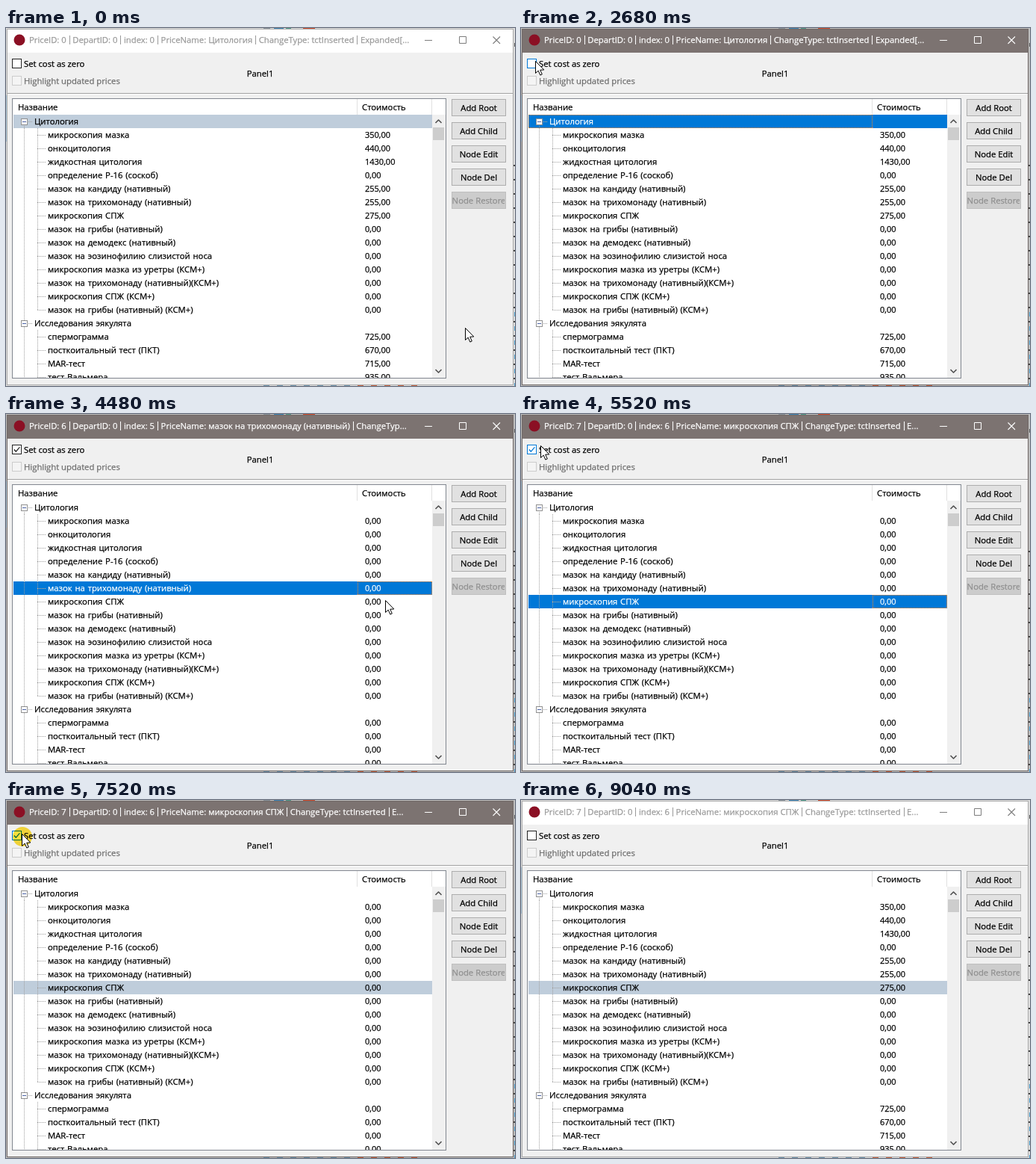
An HTML page with a canvas that plays this animation: 682 px wide and 479 px high, repeating every 9.12 s.

```html
<!DOCTYPE html>
<html lang="ru">
<head>
<meta charset="utf-8">
<title>Price tree</title>
<style>
html, body { margin: 0; width: 100%; height: 100%; overflow: hidden; background: #f0f0f0; }
canvas { display: block; }
</style>
</head>
<body>
<canvas id="stage" width="682" height="479"></canvas>
<script>
const ctx = document.getElementById('stage').getContext('2d');
const LOOP = 9120, TICK = 40, ROW_H = 18, LIST_TOP = 116;
const FAMILY = '"Open Sans", "Noto Sans", sans-serif';
const FONT = '11.3px ' + FAMILY, PRICE_FONT = '11px ' + FAMILY;
const BLUE = '#0078d7';

// Rows without a price are tree roots.
const rows = [
  ['Цитология'],
  ['микроскопия мазка', 350],
  ['онкоцитология', 440],
  ['жидкостная цитология', 1430],
  ['определение P-16 (соскоб)', 0],
  ['мазок на кандиду (нативный)', 255],
  ['мазок на трихомонаду (нативный)', 255],
  ['микроскопия СПЖ', 275],
  ['мазок на грибы (нативный)', 0],
  ['мазок на демодекс (нативный)', 0],
  ['мазок на эозинофилию слизистой носа', 0],
  ['микроскопия мазка из уретры (КСМ+)', 0],
  ['мазок на трихомонаду (нативный)(КСМ+)', 0],
  ['микроскопия СПЖ (КСМ+)', 0],
  ['мазок на грибы (нативный) (КСМ+)', 0],
  ['Исследования эякулята'],
  ['спермограмма', 725],
  ['посткоитальный тест (ПКТ)', 670],
  ['MAR-тест', 715],
  ['тест Вальмера', 935]
];

const titles = {
  0: 'PriceID: 0 | DepartID: 0 | index: 0 | PriceName: Цитология | ChangeType: tctInserted | Expanded[...',
  6: 'PriceID: 6 | DepartID: 0 | index: 5 | PriceName: мазок на трихомонаду (нативный) | ChangeTyp...',
  7: 'PriceID: 7 | DepartID: 0 | index: 6 | PriceName: микроскопия СПЖ | ChangeType: tctInserted | E...'
};

// Pointer path: time, x, y
const path = [
  [960, 672, 98], [1160, 425, 92], [1400, 176, 76], [1600, 88, 62], [1840, 37, 51],
  [2240, 20, 45], [2640, 20, 45], [2680, 19, 44], [3280, 19, 44],
  [3440, 90, 92], [3680, 360, 205], [3960, 504, 257], [4080, 504, 257],
  [4200, 504, 237], [4360, 505, 238], [4480, 508, 249], [4680, 508, 250],
  [4800, 400, 170], [4960, 194, 52], [5160, 92, 48], [5520, 26, 42],
  [6200, 26, 42], [6320, 21, 45], [7840, 21, 45],
  [8000, 95, 115], [8200, 320, 300], [8400, 510, 456], [8520, 518, 482]
];

// Pressed intervals of the mouse button
const clicks = [[2760, 3040], [4200, 4360], [4520, 4680], [5760, 6040], [6600, 6800], [7520, 7760]];

const mix = (a, b, k) => 'rgb(' + a.map((v, i) => Math.round(v + (b[i] - v) * k)).join(',') + ')';
const clamp = v => Math.max(0, Math.min(1, v));

function rect(x, y, w, h, color) {
  ctx.fillStyle = color;
  ctx.fillRect(x, y, w, h);
}

function frame(x, y, w, h, border, fill) {
  rect(x, y, w, h, border);
  rect(x + 1, y + 1, w - 2, h - 2, fill);
}

// A hairline stroke gives the text the weight of hinted screen type.
function text(s, x, y, color = '#000', align = 'left') {
  ctx.fillStyle = ctx.strokeStyle = color;
  ctx.lineWidth = 0.25;
  ctx.textAlign = align;
  ctx.fillText(s, x, y);
  ctx.strokeText(s, x, y);
}

function line(points, color, width = 1) {
  ctx.strokeStyle = color;
  ctx.lineWidth = width;
  ctx.beginPath();
  points.forEach(([x, y]) => ctx.lineTo(x, y));
  ctx.stroke();
}

function dots(x, y, length, vertical, color = '#a0a0a0') {
  for (let i = 0; i < length; i += 2) rect(vertical ? x : x + i, vertical ? y + i : y, 1, 1, color);
}

function pointerAt(t) {
  if (t < 240) return [615, 401];
  if (t < path[0][0] || t > path[path.length - 1][0]) return null;
  const i = Math.max(1, path.findIndex(p => p[0] >= t));
  const [t0, x0, y0] = path[i - 1], [t1, x1, y1] = path[i];
  const k = (t - t0) / (t1 - t0);
  return [Math.round(x0 + (x1 - x0) * k), Math.round(y0 + (y1 - y0) * k)];
}

function stateAt(t) {
  const pointer = pointerAt(t);
  return {
    pointer,
    active: t >= 9040 ? 0 : clamp((t - 440) / 320),
    selected: t < 4200 ? 0 : t < 4520 ? 6 : 7,
    listFocus: (t >= 480 && t < 2760) || (t >= 4200 && t < 5760),
    checked: (t >= 2880 && t < 5880) || (t >= 6680 && t < 7640),
    hot: !!pointer && pointer[0] >= 8 && pointer[0] < 105 && pointer[1] >= 39 && pointer[1] < 57,
    click: clicks.find(([a, b]) => t >= a && t < b)
  };
}

function drawDesktop(k) {
  rect(0, 0, 682, 479, mix([222, 222, 222], [190, 190, 190], k));
  rect(345, 0, 9, 1, '#8a949c');
  rect(359, 0, 13, 1, '#3b83b5');
  rect(375, 0, 7, 1, '#4c9a8a');
  rect(398, 0, 16, 1, '#d0492b');
  for (let y = 183; y < 470; y += 19) {
    rect(680, y, 2, 2, '#444');
    if (y > 360) rect(681, y + 7, 1, 6, '#4a9bc9');
  }
  rect(681, 20, 1, 5, '#555');
  rect(0, 90, 1, 62, '#a9c4d8');
  for (let x = 345; x < 560; x += 18) rect(x, 478, 8, 1, x > 470 ? '#c2603f' : '#6d93ad');
}

function drawTitle(s) {
  const k = s.active;
  const ink = mix([153, 153, 153], [255, 255, 255], k);
  const icon = mix([125, 125, 125], [255, 255, 255], k);
  rect(2, 2, 677, 31, mix([255, 255, 255], [124, 115, 113], k));
  ctx.fillStyle = '#8b1024';
  ctx.beginPath();
  ctx.arc(18, 16, 7.5, 0, Math.PI * 2);
  ctx.fill();
  let x = 31;
  titles[s.selected].split(' | ').forEach((part, i) => {
    if (i) {
      rect(Math.round(x + 4), 10, 1, 12, ink);
      x += 8.5;
    }
    text(part, x, 20, ink);
    x += ctx.measureText(part).width;
  });
  rect(561, 16, 10, 1, icon);
  ctx.strokeStyle = icon;
  ctx.lineWidth = 1;
  ctx.strokeRect(607.5, 11.5, 9, 9);
  line([[652.5, 11.5], [662, 21]], icon, 1.1);
  line([[662, 11.5], [652.5, 21]], icon, 1.1);
}

function drawOptions(s) {
  const ink = s.hot ? BLUE : '#222';
  frame(8, 41, 13, 13, ink, '#fff');
  if (s.checked) line([[10.8, 47.5], [13.4, 50.2], [18.4, 44.3]], ink, 1.3);
  text('Set cost as zero', 24, 52);
  frame(8, 64, 13, 13, '#ccc', '#f4f4f4');
  text('Highlight updated prices', 24, 75, '#6d6d6d');
  text('Panel1', 340.5, 65, '#000', 'center');
  rect(2, 87, 677, 1, '#a0a0a0');
  rect(2, 88, 677, 1, '#fff');
}

function drawButtons() {
  ['Add Root', 'Add Child', 'Node Edit', 'Node Del', 'Node Restore'].forEach((label, i) => {
    const y = 95 + i * 31, off = i === 4;
    frame(597, y, 73, 23, off ? '#bfbfbf' : '#adadad', off ? '#ccc' : '#e1e1e1');
    ctx.save();
    ctx.beginPath();
    ctx.rect(598, y, 70, 23);
    ctx.clip();
    text(label, 633.5, y + 16, off ? '#8f8f8f' : '#000', 'center');
    ctx.restore();
  });
}

function drawFocus(x, y, w) {
  const color = '#ff8728';
  dots(x, y, w, false, color);
  dots(x, y + ROW_H - 1, w, false, color);
  dots(x, y, ROW_H, true, color);
  dots(x + w - 1, y, ROW_H, true, color);
}

function drawRow([name, price], i, s) {
  const y = LIST_TOP + i * ROW_H, mid = y + 9, root = price === undefined;
  const picked = i === s.selected, lit = picked && s.listFocus;
  const ink = lit ? '#fff' : '#000';
  if (picked) rect(10, y, 561, ROW_H, lit ? BLUE : '#bfcddb');
  if (root) {
    if (i) dots(24, y, ROW_H, true);
    else dots(24, mid, 9, true);
    dots(30, mid, 6, false, lit ? '#d6b08c' : undefined);
    frame(20, mid - 4, 9, 9, '#919191', '#fff');
    rect(22, mid, 5, 1, '#4b63a7');
  } else {
    const last = i === 14;
    dots(24, y, ROW_H, true);
    dots(42, y, last ? 9 : ROW_H, true);
    dots(42, mid, 12, false, lit ? '#d6b08c' : undefined);
    ctx.font = PRICE_FONT;
    text((s.checked ? 0 : price) + ',00', 481, y + 13, ink);
    ctx.font = FONT;
  }
  ctx.wordSpacing = '0.8px';
  text(name, root ? 38 : 56, y + 13, ink);
  ctx.wordSpacing = '0px';
  if (lit) {
    if (root) drawFocus(10, y, 461);
    else drawFocus(471, y, 100);
  }
}

function drawList(s) {
  frame(8, 94, 582, 375, '#828790', '#fff');
  text('Название', 16, 110);
  text('Стоимость', 477, 110);
  rect(470, 95, 1, 21, '#e0e0e0');
  rect(570, 95, 1, 21, '#e0e0e0');
  ctx.save();
  ctx.beginPath();
  ctx.rect(9, LIST_TOP, 580, 352);
  ctx.clip();
  rows.forEach((row, i) => drawRow(row, i, s));
  rect(571, LIST_TOP, 18, 352, '#f0f0f0');
  rect(572, 133, 15, 17, '#cdcdcd');
  line([[575.5, 127], [579.5, 123], [583.5, 127]], '#505050', 1.6);
  line([[575.5, 457], [579.5, 461], [583.5, 457]], '#505050', 1.6);
  ctx.restore();
}

function drawPointer(s, t) {
  if (!s.pointer) return;
  const [x, y] = s.pointer;
  if (s.click) {
    ctx.save();
    ctx.globalCompositeOperation = 'multiply';
    ctx.fillStyle = '#ffdf3c';
    ctx.beginPath();
    ctx.arc(x + 1, y + 4, t - s.click[0] < 80 ? 13 : 14.5, 0, Math.PI * 2);
    ctx.fill();
    ctx.restore();
  }
  const arrow = [[0, 0], [0, 16], [3.7, 12.6], [6.3, 18.6], [8.8, 17.5], [6.2, 11.7], [11.3, 11.5]];
  ctx.beginPath();
  arrow.forEach(([dx, dy]) => ctx.lineTo(x + 0.5 + dx, y + 0.5 + dy));
  ctx.closePath();
  ctx.fillStyle = '#fff';
  ctx.fill();
  ctx.strokeStyle = '#000';
  ctx.lineWidth = 1;
  ctx.stroke();
}

function draw(now) {
  const t = Math.floor((now % LOOP) / TICK) * TICK;
  const s = stateAt(t);
  ctx.font = FONT;
  ctx.lineJoin = 'round';
  drawDesktop(s.active);
  frame(1, 1, 679, 477, mix([170, 170, 170], [112, 104, 102], s.active), '#f0f0f0');
  drawTitle(s);
  drawOptions(s);
  drawList(s);
  drawButtons();
  drawPointer(s, t);
}

function loop() {
  draw(performance.now());
  requestAnimationFrame(loop);
}
loop();
</script>
</body>
</html>
```
